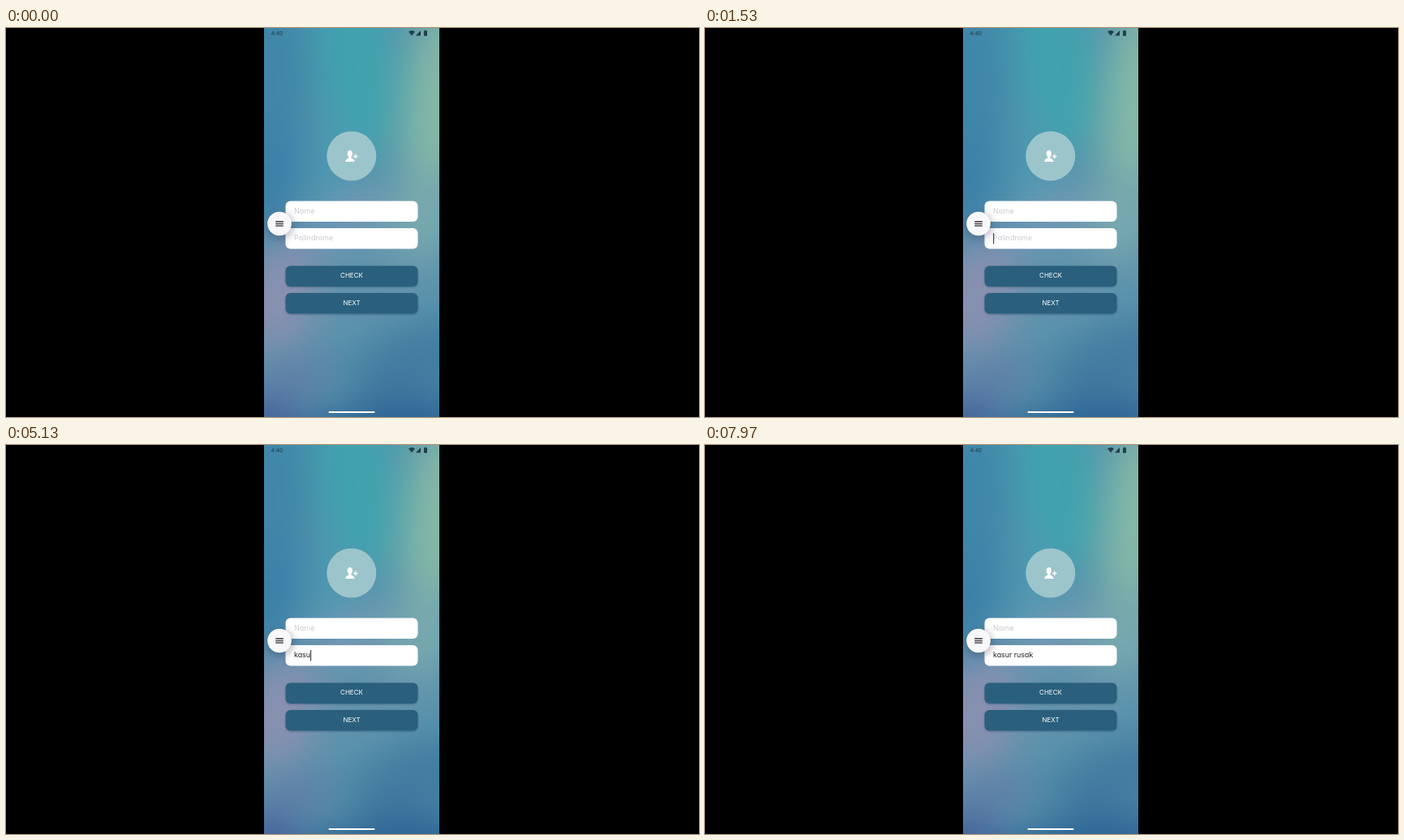
These frames come from a looping animation (854 by 480 pixels, 8000 ms). An HTML page:

```html
<!DOCTYPE html>
<html lang="en">
<head>
<meta charset="utf-8">
<title>Palindrome form</title>
<style>
  html, body { margin: 0; width: 100%; height: 100%; overflow: hidden; background: #000; }
  svg { display: block; width: 100%; height: 100%; }
  text { font-family: Inter, "Open Sans", sans-serif; font-feature-settings: "cv11"; white-space: pre; }
  .hint { font-size: 9px; fill: #cbcbd2; }
  .label { font-size: 8px; fill: #fff; text-anchor: middle; }
  .roboto { font-family: Roboto, sans-serif; }
</style>
</head>
<body>
<svg viewBox="0 0 854 480">
  <defs>
    <clipPath id="screen"><rect x="318" width="216" height="480"/></clipPath>
    <filter id="soft" filterUnits="userSpaceOnUse" x="200" y="-120" width="452" height="720" color-interpolation-filters="sRGB">
      <feGaussianBlur stdDeviation="24"/>
    </filter>
    <filter id="glow" x="-50%" y="-50%" width="200%" height="200%"><feGaussianBlur stdDeviation="4"/></filter>
    <filter id="lift" x="-10%" y="-30%" width="120%" height="170%">
      <feDropShadow dx="0" dy="1" stdDeviation="1.2" flood-color="#102840" flood-opacity=".35"/>
    </filter>
  </defs>
  <rect width="854" height="480"/>
  <g clip-path="url(#screen)">
    <g id="wall" filter="url(#soft)"><rect x="200" y="-120" width="452" height="720" fill="#5a93ac"/></g>

    <g fill="#21404a">
      <text class="roboto" x="326.5" y="9" font-size="7.5">4:40</text>
      <path d="M496 4.6Q500 1.4 504 4.6L500 9.6Z"/>
      <path d="M505 9.5L511 3V9.5Z"/>
      <path d="M515 3.6H516.2V2.8H517.8V3.6H519V9.8H515Z"/>
    </g>

    <circle cx="425.8" cy="158" r="30.5" fill="#9cc5cb"/>
    <g fill="#fff">
      <ellipse cx="423.8" cy="154.9" rx="3.1" ry="3.9"/>
      <path d="M418.2 165Q418.2 161.6 422.3 160.5V157.5H425.3V160.5Q429.6 161.6 429.6 165Z"/>
      <path d="M428 158.4H433.4M430.7 155.7V161.1" stroke="#fff" stroke-width="1.5"/>
    </g>

    <g fill="#fff">
      <rect x="344.5" y="213.5" width="163" height="25.5" rx="6"/>
      <rect x="344.5" y="247" width="163" height="25.5" rx="6"/>
    </g>
    <circle cx="338" cy="244" r="17" fill="#303048" opacity=".28" filter="url(#glow)"/>
    <text class="hint" x="355" y="228.6">Name</text>
    <text class="hint" x="355" y="262.1" id="hint">Palindrome</text>
    <text x="355" y="262.1" id="typed" font-size="8.85" fill="#1c1c20"></text>
    <rect id="caret" y="253" width="1.2" height="13.5" fill="#48484c"/>

    <g fill="#2a617d" filter="url(#lift)">
      <rect x="344.5" y="293.5" width="163" height="25.5" rx="6"/>
      <rect x="344.5" y="327" width="163" height="25.5" rx="6"/>
    </g>
    <text class="label" x="426" y="308.4">CHECK</text>
    <text class="label" x="426" y="341.9">NEXT</text>

    <circle cx="337" cy="241.5" r="14.8" fill="#f8f8fa"/>
    <path d="M332.2 239H341.8M332.2 241.6H341.8M332.2 244.2H341.8" stroke="#303034" stroke-width="1.3"/>

    <g id="toast">
      <rect x="360.5" y="419" width="131" height="23" rx="11.5" fill="#f9f9fb" filter="url(#lift)"/>
      <g id="message">
        <circle cx="375.4" cy="430.6" r="6.2" fill="#45d97c"/>
        <text class="roboto" x="387" y="433.3" font-size="7.35" fill="#2c2c30">Please enter your palindrome</text>
      </g>
    </g>
    <rect x="397.5" y="473" width="57" height="2" rx="1" fill="#fff"/>
  </g>
</svg>
<script>
const LOOP = 8000;
const PHRASE = 'kasur rusak';
const FIRST_KEY = 3980, KEY_STEP = 346;
const FOCUS = 415;
const TOAST_IN = 2700, TOAST_OUT = 4720;

const $ = id => document.getElementById(id);
const [wall, hint, typed, caret, toast, message] =
  ['wall', 'hint', 'typed', 'caret', 'toast', 'message'].map($);
const ramp = (t, from, span) => Math.min(1, Math.max(0, (t - from) / span));

// Wallpaper blobs: colour, centre, radii, tilt
[
  ['#3f86a9', 325, 60, 50, 140, 0],
  ['#3fa3ae', 432, 40, 48, 120, -8],
  ['#86b9a6', 535, 90, 42, 130, 6],
  ['#3b80a8', 320, 190, 46, 70, 15],
  ['#4f98b0', 400, 170, 35, 50, 0],
  ['#78a9ae', 515, 235, 45, 55, 20],
  ['#7898b4', 425, 235, 50, 28, -25],
  ['#8b90b0', 338, 330, 46, 72, 15],
  ['#6591ac', 460, 320, 60, 30, -25],
  ['#3f7ca0', 505, 410, 90, 42, -20],
  ['#5f78a4', 350, 435, 60, 20, -20],
  ['#2c6394', 480, 500, 130, 40, -5],
  ['#3f5c98', 315, 500, 55, 36, 0]
].forEach(([fill, cx, cy, rx, ry, tilt]) => {
  const e = document.createElementNS('http://www.w3.org/2000/svg', 'ellipse');
  const attrs = { fill, cx, cy, rx, ry, transform: `rotate(${tilt} ${cx} ${cy})` };
  for (const k in attrs) e.setAttribute(k, attrs[k]);
  wall.append(e);
});

function drawField(t) {
  const count = Math.max(0, Math.min(PHRASE.length, Math.floor((t - FIRST_KEY) / KEY_STEP) + 1));
  const text = PHRASE.slice(0, count);
  if (typed.textContent !== text) typed.textContent = text;
  hint.style.opacity = count ? 0 : 1;

  // Each key press restarts the blink
  const since = t - (count ? FIRST_KEY + (count - 1) * KEY_STEP : FOCUS);
  caret.style.opacity = since >= 0 && since % 1000 < 500 ? 1 : 0;
  caret.setAttribute('x', 355 + (count ? typed.getComputedTextLength() : 0));
}

function drawToast(t) {
  const grow = 1 - (1 - ramp(t, TOAST_IN, 333)) ** 6;
  const shrink = ramp(t, TOAST_OUT, 250) ** 2;
  const scale = 0.9 + 0.1 * (grow - shrink);
  toast.style.opacity = ramp(t, TOAST_IN, 100) - ramp(t, TOAST_OUT + 150, 100);
  message.style.opacity = ramp(t, TOAST_IN + 50, 83) - ramp(t, TOAST_OUT, 166);
  toast.setAttribute('transform', `translate(426 430.5) scale(${scale}) translate(-426 -430.5)`);
}

const start = performance.now();
function tick() {
  const t = (performance.now() - start) % LOOP;
  drawField(t);
  drawToast(t);
  requestAnimationFrame(tick);
}
tick();
</script>
</body>
</html>
```
